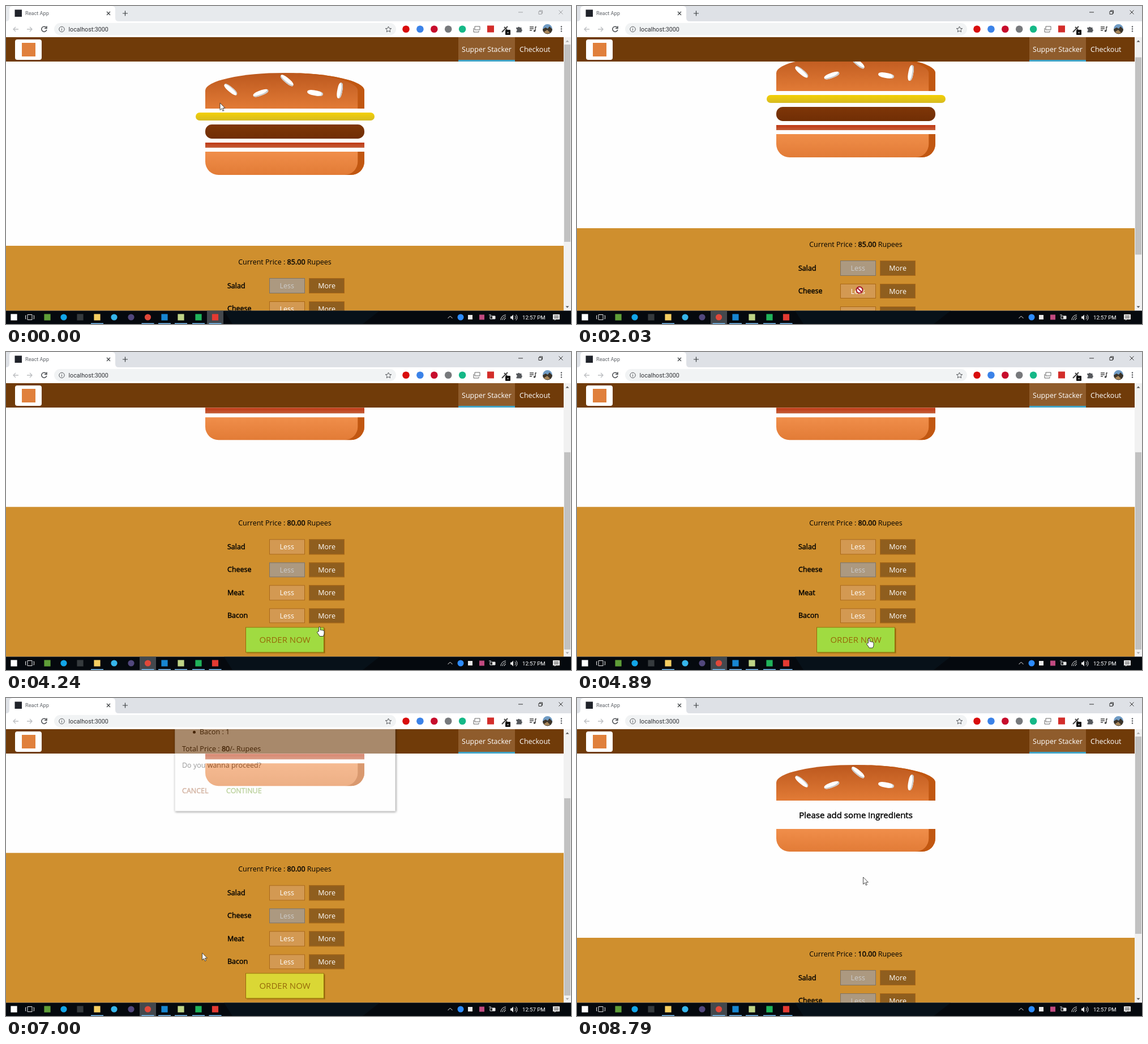
Recreate the animation shown at these times as an HTML page. Size 998 by 561 pixels, loop 9.06 s.

```html
<!DOCTYPE html>
<html lang="en">
<head>
<meta charset="utf-8">
<title>React App</title>
<style>
  html, body { margin: 0; width: 100%; height: 100%; overflow: hidden; background: #fff; }
  #stage { position: relative; width: 998px; height: 561px; overflow: hidden; font: 12.5px/18px "Open Sans", sans-serif; color: #000; }
  #stage svg, .layer { position: absolute; left: 0; top: 0; width: 998px; height: 561px; }
  .layer div, .layer span { position: absolute; box-sizing: border-box; white-space: nowrap; }
  .strong { -webkit-text-stroke: .45px currentColor; }
  #view { clip-path: inset(55px 13px 23.5px 0); background: #fefefe; }

  .burger { left: 317px; top: 118.3px; width: 351px; }
  .layer .burger > div { position: relative; margin: 0 auto 7px; width: 281px; }
  .layer .top { height: 62.4px; border-radius: 50% 50% 0 0; background: linear-gradient(#bc581e, #e27b36); box-shadow: inset -11.7px 0 #c15711; }
  .layer .bottom { height: 40.6px; border-radius: 0 0 23.4px 23.4px; background: linear-gradient(#f08e4a, #e27b36); box-shadow: inset -11.7px 0 #c15711; }
  .layer .burger > #salad { width: 298px; height: 21.8px; border-radius: 16px; background: linear-gradient(#228c1d, #91ce50); }
  .layer .burger > #cheese { width: 316px; height: 14px; border-radius: 16px; background: linear-gradient(#f4d004, #d6bb22); }
  #meat { height: 25px; border-radius: 11.7px; background: linear-gradient(#7f3608, #702e05); }
  #bacon { height: 9.4px; background: linear-gradient(#bf3813, #c45e38); }
  #empty { height: 36.2px; font-size: 15px; line-height: 36.2px; text-align: center; }
  .seed, .seed::before, .seed::after { position: absolute; background: #fff; border-radius: 40%; }
  .seed { width: 10%; height: 15%; top: 50%; }
  .seed::before, .seed::after { width: 100%; height: 100%; }
  .s1 { left: 30%; transform: rotate(-20deg); box-shadow: inset -1.6px -2.3px #c9c9c9; }
  .s1::after { content: ""; left: -170%; top: -260%; transform: rotate(60deg); box-shadow: inset -.8px 1.6px #c9c9c9; }
  .s1::before { content: ""; left: 180%; top: -50%; transform: rotate(60deg); box-shadow: inset -.8px -2.3px #c9c9c9; }
  .s2 { left: 64%; transform: rotate(10deg); box-shadow: inset -2.3px 0 #c9c9c9; }
  .s2::before { content: ""; left: 150%; top: -130%; transform: rotate(90deg); box-shadow: inset .8px 2.3px #c9c9c9; }

  .controls { left: 0; top: 422.5px; width: 985px; height: 270px; background: #cf8f2e; }
  .price { left: 0; width: 985px; top: 443px; text-align: center; }
  .button { width: 62.5px; height: 26.5px; border: 1px solid #aa6817; color: #fff; text-align: center; line-height: 25px; }
  .less { left: 465px; background: #d39952; }
  .less.off { background: #ac9980; border-color: #7e7365; color: #ccc; }
  .more { left: 535.4px; background: #8f5e1e; }
  .more.hover { background: #99703f; }
  #order { left: 423px; top: 635px; width: 139px; height: 44.5px; border: 1px solid #966909; box-shadow: 1.6px 1.6px 1.6px #966909;
    background: #dad735; color: #966909; font-size: 15px; line-height: 43px; text-align: center; }
  #order.hover { background: #a0db41; }

  .bar { left: 0; top: 55px; width: 985px; height: 43.3px; background: #703b09; }
  .tile { left: 15.5px; top: 59px; width: 47.5px; height: 35.6px; border-radius: 4px; background: #fff; }
  .tile div { left: 12px; top: 6px; width: 24px; height: 24px; background: #e0803c; }
  .tab { top: 55px; height: 43.3px; line-height: 43px; color: #fff; text-align: center; }
  .tab.on { left: 799px; width: 100px; background: #8f5c2c; border-bottom: 3px solid #40a4c8; }
  #backdrop { left: 0; top: 55px; width: 985px; height: 483px; background: rgba(0, 0, 0, .5); }
  #modal { left: 298px; top: 200px; width: 390px; height: 292px; background: #fff; border: 1px solid #ccc; box-shadow: 1px 1px 4px #000; }
</style>
</head>
<body>
<div id="stage">
  <div class="layer" id="view">
    <div class="layer" id="page">
      <div class="burger">
        <div class="top"><div class="seed s1"></div><div class="seed s2"></div></div>
        <div id="salad"></div><div id="cheese"></div><div id="meat"></div><div id="bacon"></div>
        <div id="empty" class="strong">Please add some ingredients</div>
        <div class="bottom"></div>
      </div>
      <div class="controls"></div>
      <div class="price">Current Price : <b id="price" class="strong" style="font-weight:400"></b> Rupees</div>
      <div id="order">ORDER NOW</div>
    </div>
    <div class="bar"></div>
    <div class="tile"><div></div></div>
    <div class="tab on">Supper Stacker</div>
    <div class="tab" style="left:907px">Checkout</div>
    <div id="backdrop"></div>
    <div id="modal"></div>
  </div>

  <svg viewBox="0 0 998 561" id="frame" fill="none" font-family="Roboto, sans-serif">
    <path id="strip" d="M0 0H998V28H0z"/>
    <path fill="#fff" d="M0 55V27Q6 27 6 21V6Q6 0 12 0H187Q193 0 193 6V21Q193 27 199 27H998V55z"/>
    <rect x="15.5" y="6.5" width="12.5" height="12.5" fill="#20232a"/>
    <text x="34" y="16.4" font-size="9.2" fill="#5f6368">React App</text>
    <path stroke="#3c4043" stroke-width="1.2" d="M178 10l6 6m0-6l-6 6M206 13h9m-4.500-4.500v9"/>
    <path id="window" d="M905 11h8M941 9.500h5v5h-5zM942.500 9.500v-1.500h5v5h-1.500M976.500 7.500l7 7m0-7l-7 7"/>
    <path stroke="#bcbec1" stroke-width="1.300" d="M22 41h-9m4-4l-4 4 4 4M37 41h9m-4-4l4 4-4 4"/>
    <path stroke="#4a4d51" stroke-width="1.500" d="M71 38a4.600 4.600 0 1 0 .8 4M72 35.500v4h-4"/>
    <rect x="85" y="30" width="604" height="21.500" rx="10.750" fill="#f1f3f4"/>
    <g stroke="#55585c"><circle cx="98.500" cy="41" r="4.700"/><path d="M98.500 40.300v3.200m0-5.200v1"/>
      <path d="M675.500 36l1.500 3.400 3.700.3-2.800 2.500.8 3.600-3.200-1.900-3.200 1.900.8-3.600-2.800-2.500 3.700-.3z"/></g>
    <text x="110.500" y="44.600" font-size="10.700" fill="#303236">localhost:3000</text>
    <g id="extensions"></g>
    <path stroke="#666" d="M828 36h9v6h-9zM826 39v7h9v-2"/>
    <path stroke="#444" stroke-width="2" d="M876 46l6-6m-2-3l5 5m-2-3l3-3"/>
    <rect x="882" y="42" width="9" height="9" rx="1" fill="#111"/><path stroke="#fff" d="M885 47h3"/>
    <path fill="#55585c" d="M901 38h3a1.900 1.900 0 0 1 3.600 0h3v3a1.900 1.900 0 0 1 0 3.600v2h-9v-2.600a1.700 1.700 0 0 0 0-3.200z"/>
    <path stroke="#444" stroke-width="1.400" d="M925 37h7m-7 3h7m-7 3h4m6 1v-7h2"/><circle cx="933.500" cy="44" r="1.800" fill="#444"/>
    <circle cx="956.500" cy="40.500" r="8.500" fill="#6f9bc4"/><path fill="#3c3429" d="M948 41l5-3 4 2 3-4 5 5a8.500 8.500 0 0 1-17 0z"/><path fill="#a8865a" d="M950 46l6-4 5 5a8.500 8.500 0 0 1-11-1z"/>
    <g fill="#55585c"><circle cx="981" cy="36.500" r="1.200"/><circle cx="981" cy="40.500" r="1.200"/><circle cx="981" cy="44.500" r="1.200"/></g>

    <path fill="#f1f1f1" d="M985 55h13v483h-13z"/>
    <rect id="thumb" x="986" width="11" height="348" fill="#c1c1c1"/>
    <path id="up" d="M988.500 63.500l3-3 3 3z"/><path id="down" d="M988.500 529.500l3 3 3-3z"/>

    <path fill="#05090e" d="M0 537.500H998V561H0z"/><path fill="#0a1b24" opacity=".5" d="M385 537.500H660l-30 23.500H400z"/>
    <rect id="active" y="537.500" width="29" height="23.500" fill="#43484d"/>
    <g id="tasks"></g>
    <g stroke="#e8e8e8">
      <path d="M38 544.500h8v9h-8zM35.500 546h-1v6h1m13-6h1v6h-1"/>
      <path d="M780.500 551l4-4 4 4"/>
      <path d="M855 547h9v5h-9zM853 545h4m17 9a9 9 0 0 1 9-9m-6 9a6 6 0 0 1 6-6m-3 6a3 3 0 0 1 3-3M899 546.500q3 3 0 6m2-8q4 5 0 10"/>
      <path fill="#e8e8e8" stroke="none" d="M891 547.500h2l3-3v10l-3-3h-2zM966 544h12v9h-7l-2 2v-2h-3zM859 547h5v5h-5z"/>
      <path stroke="#222" d="M968 547h8m-8 3h8"/>
    </g>
    <text x="912" y="552.800" font-size="9.600" fill="#fff">12:57 PM</text>

    <g id="cursor">
      <path id="arrow" fill="#fff" stroke="#222" stroke-width=".8" d="M0 0v12.500l2.900-2.700 2 4.500 2-.9-2-4.300h4z"/>
      <path id="hand" fill="#fff" stroke="#222" stroke-width=".9" stroke-linejoin="round" d="M-1.500 8V1.200a1.300 1.300 0 0 1 2.600 0V5.500q2-1 2.500.4 2-.8 2.500.5 1.900-.4 1.900 1.300V12q-.4 2.500-1.700 4.500H.2Q-1.500 13.500-4 10.500q-1-2 .8-2.300z"/>
      <g id="no"><circle r="5.500" fill="#fff" stroke="#a51428" stroke-width="2"/><path stroke="#a51428" stroke-width="2" d="M-4-4l8 8"/></g>
    </g>
  </svg>
</div>
<script>
const LOOP = 9060, MAX_SCROLL = 149.7;
const $ = id => document.getElementById(id);
const add = (parent, html) => parent.insertAdjacentHTML("beforeend", html);
const between = (t, a, b) => t >= a && t < b;

const foods = [
  { id: "salad", name: "Salad", cost: 10, from: 2600, to: 7640 },
  { id: "cheese", name: "Cheese", cost: 15, from: 0, to: 3560 },
  { id: "meat", name: "Meat", cost: 40, from: 0, to: 7890 },
  { id: "bacon", name: "Bacon", cost: 20, from: 0, to: 8110 }
];
foods.forEach((food, i) => {
  const y = 493.5 + i * 40.5, top = `style="top:${y - 13.3}px"`;
  add($("page"), `<span class="strong" style="left:391px;top:${y - 9}px">${food.name}</span>
    <div class="button less" ${top} id="${food.id}Less">Less</div><div class="button more" ${top} id="${food.id}More">More</div>`);
});

const modalLine = (x, y, html, style = "") =>
  add($("modal"), `<span style="left:${x}px;top:${y - 9}px;${style}">${html}</span>`);
modalLine(12, 38, "Your Order", "font-size:14.6px;-webkit-text-stroke:.45px");
modalLine(12, 70, "A delicious burger with the following ingredients:");
foods.forEach((food, i) => {
  modalLine(31, 99.3 + i * 17.3, "", "width:5px;height:5px;margin-top:7px;border-radius:50%;background:#000");
  modalLine(43, 99.3 + i * 17.3, `${food.name} : ${food.id === "cheese" ? 0 : 1}`);
});
modalLine(12, 180.5, 'Total Price : <b class="strong" style="font-weight:400">80</b>/- Rupees');
modalLine(12, 210.3, "Do you wanna proceed?");
modalLine(12, 255.3, "CANCEL", "color:#944317;-webkit-text-stroke:.45px");
modalLine(90, 255.3, "CONTINUE", "color:#5c9210;-webkit-text-stroke:.45px");

const dot = (x, y, r, color) => `<circle cx="${x}" cy="${y}" r="${r}" fill="${color}"/>`;
const square = (x, y, r, color) => `<rect x="${x - r}" y="${y - r}" width="${2 * r}" height="${2 * r}" fill="${color}"/>`;
["#d90d0d", "#3b82e8", "#c70d2c", "#77797c", "#15b887"].forEach((color, i) =>
  add($("extensions"), dot(706.5 + i * 24.9, 40.7, 6.3, color)));
add($("extensions"), square(856, 40.5, 6, "#d32d2a"));

const tasks = [
  [14, square, "#fff"], [73, square, "#5f9e38"], [102, dot, "#12a5e8"], [131, square, "#353a3d"],
  [161, square, "#f5ce62"], [191, dot, "#36b5ea"], [221, dot, "#51477c"], [250.5, dot, "#e0483a"],
  [280, square, "#1786d1"], [309, square, "#bfd487"], [340, square, "#20b35a"], [369.5, square, "#e33a32"]
];
tasks.forEach(([x, shape, color]) => {
  add($("tasks"), shape(x, 549, 5.6, color));
  if (x === 161 || x > 240) add($("tasks"), `<path fill="#76b9ed" d="M${x - 11} 559.4h22v1.600h-22z"/>`);
});
add($("tasks"), dot(803, 549, 5.5, "#2d8cff") + square(820, 549, 4, "#e8e8e8") + square(840.5, 549, 4.5, "#c04a80"));

const scrollKeys = [[150, 0], [400, 1], [700, 1], [950, 0], [1990, 0], [2130, 1], [2950, 1], [3150, 0],
  [3280, 0], [3420, 1], [3640, 1], [3760, 0], [3880, 0], [4020, 1], [8200, 1], [8400, 0]];
const pathKeys = [[130, 378, 171], [700, 440, 310], [1450, 499, 501], [2200, 499, 501], [2500, 566, 345],
  [3150, 560, 352], [3450, 496, 385], [3700, 496, 385], [4240, 554, 485], [4350, 554, 485], [4890, 516, 505.5],
  [5720, 518, 502], [6240, 534, 342], [6780, 334, 455], [6930, 334, 455], [7440, 572.5, 356.5], [7580, 496, 345],
  [7680, 496, 345], [7840, 496, 424], [7920, 496, 424], [8060, 496, 464], [8180, 496, 464], [8510, 500, 365], [8790, 505.5, 316]];
const cursorSteps = [[0, "arrow"], [1400, "no"], [2100, "arrow"], [2420, "hand"], [2800, "arrow"], [3420, "hand"],
  [3570, "no"], [3730, "arrow"], [4180, "hand"], [5640, "arrow"], [6740, "hand"], [6900, "arrow"], [7380, "hand"],
  [7650, "no"], [7740, "hand"], [7900, "no"], [7980, "hand"], [8120, "no"], [8230, "arrow"]];

function tween(keys, t) {
  const next = keys.findIndex(key => key[0] > t);
  if (next === 0) return keys[0].slice(1);
  if (next < 0) return keys[keys.length - 1].slice(1);
  const a = keys[next - 1], b = keys[next], u = (t - a[0]) / (b[0] - a[0]), k = u * u * (3 - 2 * u);
  return a.slice(1).map((v, i) => v + (b[i + 1] - v) * k);
}
const easeOut = u => 1 - (1 - Math.min(1, Math.max(0, u))) ** 1.8;
const show = (id, on) => { $(id).style.display = on ? "" : "none"; };

function draw(t) {
  const scroll = tween(scrollKeys, t)[0] * MAX_SCROLL, [x, y] = tween(pathKeys, t);
  const focused = t >= 1300;
  $("page").style.transform = `translateY(${-scroll}px)`;
  $("thumb").setAttribute("y", 68 + scroll * .727);
  $("up").setAttribute("fill", scroll > 0 ? "#505050" : "#a3a3a3");
  $("down").setAttribute("fill", scroll < MAX_SCROLL ? "#505050" : "#a3a3a3");
  $("strip").setAttribute("fill", focused ? "#dee1e6" : "#e7eaed");
  $("window").setAttribute("stroke", focused ? "#333" : "#a0a2a5");
  $("active").setAttribute("x", focused ? 236 : 355);

  let total = 10;
  for (const food of foods) {
    const on = between(t, food.from, food.to);
    if (on) total += food.cost;
    show(food.id, on);
    $(food.id + "Less").classList.toggle("off", !on);
  }
  show("empty", total === 10);
  $("price").textContent = total.toFixed(2);
  $("saladMore").classList.toggle("hover", between(t, 2420, 2800) || between(t, 7380, 7520));
  $("order").classList.toggle("hover", between(t, 4180, 5640));

  const open = easeOut((t - 6110) / 400) - easeOut((t - 6880) / 300);
  show("backdrop", between(t, 5640, 6880));
  $("modal").style.opacity = open;
  $("modal").style.transform = `translateY(${(open - 1) * 483}px)`;

  const kind = cursorSteps.filter(step => step[0] <= t).pop()[1];
  for (const id of ["arrow", "hand", "no"]) show(id, id === kind);
  $("cursor").setAttribute("transform", `translate(${x} ${y})`);
}
function tick() {
  draw(performance.now() % LOOP);
  requestAnimationFrame(tick);
}
tick();
</script>
</body>
</html>
```
